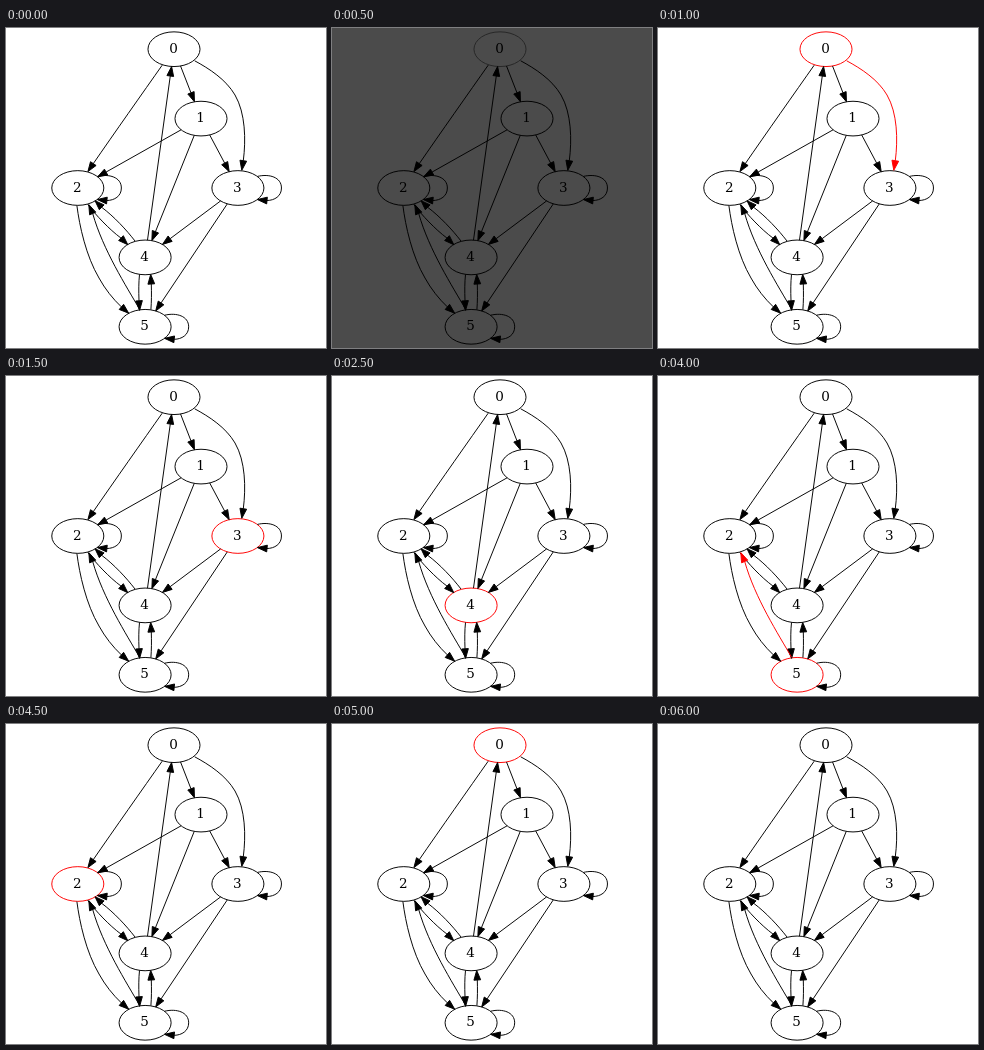
Write an HTML page that moves like this. It is 320x320 px and loops after 6500 ms.

```html
<!DOCTYPE html>
<html lang="en">
<head>
<meta charset="utf-8">
<title>Graph traversal</title>
<style>
  html, body { margin: 0; width: 100%; height: 100%; overflow: hidden; background: #fff; }
  svg { display: block; width: 100vw; height: 100vh; }
  text { font: 13.5px "DejaVu Serif", "Noto Serif", serif; text-anchor: middle; }
</style>
</head>
<body>
<svg id="stage" viewBox="0 0 320 320"></svg>
<script>
const NS = "http://www.w3.org/2000/svg";
const stage = document.getElementById("stage");
const UNIT = 320 / 332;
const RX = 27 * UNIT, RY = 18 * UNIT;
const STEP = 500;

const centers = [[168, 21.2], [195, 90.6], [71.8, 160], [231.9, 160], [139.1, 229.4], [139.1, 298.8]];

// Edges that run straight from centre to centre.
const straight = ["0-1", "1-2", "1-3", "1-4", "3-4", "3-5", "4-0"];

// Curved edges: Bezier path up to the arrow base, then the tip.
const curved = {
  "0-2": ["M156.2 37.2C138 63 107 107 87.3 135.6", 81.9, 143.6],
  "0-3": ["M188.7 32.8C203 40.5 220 51.5 229 67C239.5 85 240 112 237.3 132.7", 235.8, 142.3],
  "2-4": ["M81.7 176.4C90.2 187.4 102.7 200.9 115 210.1", 121.8, 216.7],
  "2-5": ["M70.9 177.6C73.5 198 80 228 93 250C99 261 107 271 115.4 278.9", 122.7, 285.2],
  "4-2": ["M129 213C120.5 202 108 188.5 95.7 179.3", 89, 172.7],
  "4-5": ["M133.5 246.5C132.7 254 132.6 263 133 272.8", 133.6, 282.4],
  "5-2": ["M133.6 281.3C120.5 258.5 97 222 86.7 185.5", 82.8, 176.6],
  "5-4": ["M144.9 281.7C145.5 274 145.6 265 145.3 256", 144.7, 246.4]
};

// Highlighted parts for each step; a name with a dash is an edge.
const steps = [[], [], ["0", "0-3"], ["3"], ["3", "3-4"], ["4"], ["4", "4-5"],
  ["5"], ["5", "5-2"], ["2"], ["0"], ["1"], []];
const DIM_STEP = 1;

function add(parent, tag, attrs) {
  const el = document.createElementNS(NS, tag);
  for (const key in attrs) el.setAttribute(key, attrs[key]);
  parent.appendChild(el);
  return el;
}

const back = add(stage, "rect", { width: 320, height: 320 });
const parts = {};

function group(name) {
  return parts[name] = add(stage, "g", { "stroke-width": UNIT });
}

function addEdge(name, path, bx, by, tx, ty) {
  const g = group(name);
  const len = Math.hypot(tx - bx, ty - by);
  const nx = -(ty - by) / len * 3.5 * UNIT;
  const ny = (tx - bx) / len * 3.5 * UNIT;
  add(g, "path", { d: path, fill: "none" });
  add(g, "path", { d: `M${tx} ${ty}L${bx + nx} ${by + ny}L${bx - nx} ${by - ny}Z` });
}

function addStraight(name) {
  const [[x1, y1], [x2, y2]] = name.split("-").map(i => centers[i]);
  const len = Math.hypot(x2 - x1, y2 - y1);
  const dx = (x2 - x1) / len, dy = (y2 - y1) / len;
  const rim = 1 / Math.hypot(dx / RX, dy / RY);
  const base = rim + 10 * UNIT;
  const bx = x2 - dx * base, by = y2 - dy * base;
  addEdge(name, `M${x1 + dx * rim} ${y1 + dy * rim}L${bx} ${by}`, bx, by, x2 - dx * rim, y2 - dy * rim);
}

function addLoop(i) {
  const [cx, cy] = centers[i];
  const at = (x, y) => `${cx + x * UNIT} ${cy + y * UNIT}`;
  const path = `M${at(20.2, -12)}C${at(32.5, -15)} ${at(45.2, -11.2)} ${at(45.2, 0)}` +
    `C${at(45.2, 8.6)} ${at(38, 12.8)} ${at(30.2, 13)}`;
  addEdge(i + "-" + i, path, cx + 30.2 * UNIT, cy + 13 * UNIT, cx + 20.2 * UNIT, cy + 12 * UNIT);
}

centers.forEach(([cx, cy], i) => {
  const g = group(String(i));
  add(g, "ellipse", { cx, cy, rx: RX, ry: RY, fill: "none" });
  add(g, "text", { x: cx - 0.5, y: cy + 3.6, fill: "#000", stroke: "none" }).textContent = i;
});

straight.forEach(addStraight);

for (const name in curved) {
  const [path, tx, ty] = curved[name];
  const [bx, by] = path.match(/[\d.]+/g).slice(-2).map(Number);
  addEdge(name, path, bx, by, tx, ty);
}

[2, 3, 5].forEach(addLoop);

function paint(part, color) {
  part.setAttribute("stroke", color);
  part.setAttribute("fill", color);
}

function draw(time) {
  const step = Math.floor(time / STEP) % steps.length;
  const dim = step === DIM_STEP;
  const page = dim ? "#4b4b4b" : "#fff";
  back.setAttribute("fill", page);
  document.body.style.background = page;
  for (const name in parts) {
    paint(parts[name], steps[step].includes(name) ? "#f00" : "#000");
  }
  if (dim) paint(parts["0"], "#262626");
}

const start = performance.now();
function tick(now) {
  draw(Math.max(0, now - start));
  requestAnimationFrame(tick);
}
draw(0);
requestAnimationFrame(tick);
</script>
</body>
</html>
```
